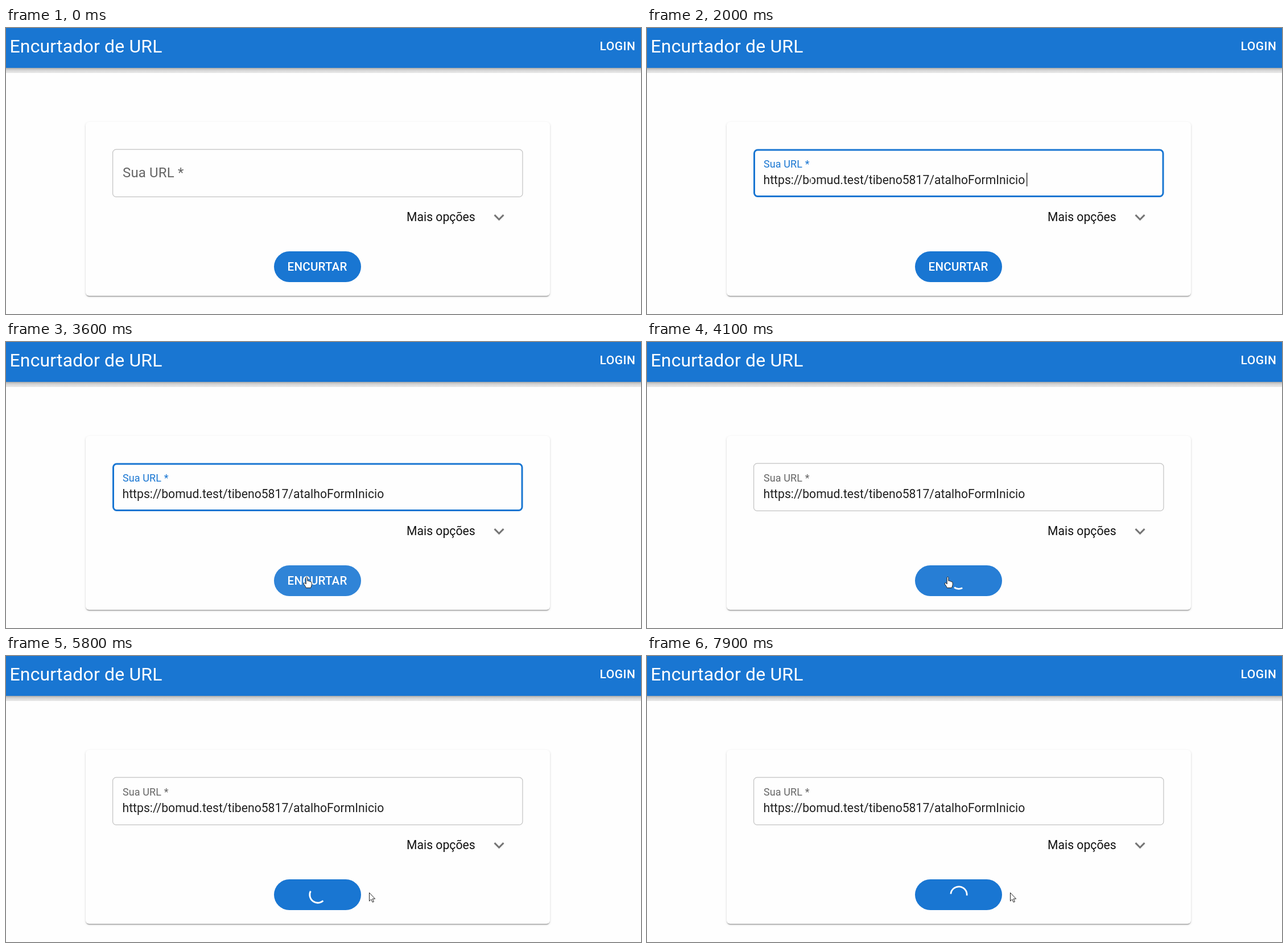
Animation, 1116 px wide and 502 px high, one loop 8 s. Source, as an HTML page:

```html
<!DOCTYPE html>
<html lang="pt">
<head>
<meta charset="utf-8">
<title>Encurtador de URL</title>
<style>
  html, body { margin: 0; width: 100%; height: 100%; overflow: hidden; background: #fefefe; }
  .stage { position: relative; width: 1116px; height: 502px; overflow: hidden; }
  .bar { position: absolute; left: 0; top: 0; width: 100%; height: 70px; background: #1976d2; }
  .bar::after {
    content: ""; position: absolute; left: 0; top: 70px; width: 100%; height: 9px;
    background: linear-gradient(#a8a8a8, #cfcfcf 35%, #e2e2e2 75%, #e8e8e8);
  }
  .card {
    position: absolute; left: 140px; top: 165px; width: 816px; height: 305px;
    border-radius: 6px; background: #fefefe;
    box-shadow: 0 3px 1.5px -1.5px rgba(0,0,0,.2), 0 1.5px 1.5px rgba(0,0,0,.14), 0 1.5px 4.5px rgba(0,0,0,.12);
  }
  svg { position: absolute; left: 0; top: 0; }
  text { font-family: Roboto, sans-serif; white-space: pre; }
  .title { font-size: 32px; letter-spacing: .15px; fill: #fff; }
  .login { font-size: 21px; font-weight: 500; letter-spacing: .5px; fill: #fff; }
  .action { font-size: 20.6px; font-weight: 500; letter-spacing: .2px; fill: #fff; }
  .body { font-size: 21.2px; }
  .label { font-size: 24px; letter-spacing: .15px; }
  .cursor path { fill: #fff; stroke: #222; stroke-width: 1; stroke-linejoin: round; }
  .cursor .beam { fill: none; stroke: #fff; stroke-width: 2; }
</style>
</head>
<body>
<div class="stage">
  <div class="bar"></div>
  <div class="card"></div>
  <svg width="1116" height="502" viewBox="0 0 1116 502">
    <text class="title" x="6.5" y="43">Encurtador de URL</text>
    <text class="login" x="1043.5" y="39">LOGIN</text>

    <rect id="field" fill="none"/>
    <g id="label"><text class="label">Sua URL *</text></g>
    <text id="url" class="body" x="204.5" y="274" fill="#212121">https://bomud.test/tibeno5817/atalhoFormInicio</text>
    <rect id="caret" y="254" width="1.3" height="24" fill="#222"/>

    <text class="body" x="704" y="339" fill="#111">Mais opções</text>
    <path transform="translate(848.5 314.2) scale(1.5)" fill="#757575"
      d="M16.59 8.59 12 13.17 7.41 8.59 6 10l6 6 6-6z"/>

    <rect x="471" y="392" width="153" height="54" rx="27" fill="#1976d2"/>
    <rect id="ripple" x="471" y="392" width="153" height="54" rx="27" fill="#fff"/>
    <text id="action" class="action" x="494.6" y="425.5">ENCURTAR</text>
    <g id="spinner">
      <circle id="arc" r="14.2" fill="none" stroke="#fff" stroke-width="2.8" pathLength="125.66"/>
    </g>

    <g id="cursor" class="cursor">
      <path id="arrow" d="M.5 .5V15.2L3.8 12.1 6.2 17.2 8.4 16.2 6.1 11.2H10.6Z"/>
      <path id="beam" class="beam" d="M-3 -10Q0 -10 0 -8V8Q0 10 -3 10M3 -10Q0 -10 0 -8V8Q0 10 3 10"/>
      <path id="hand" d="M-.8 1.6Q-.8 .4 .5 .4T1.8 1.6V7.2Q4 6.4 4.5 8 6.6 7.4 7 8.9 9.2 8.5 9.2 10.8V14.5L7.6 19.5H-.8L-1.4 17.5-4.6 13Q-5.4 11.2-3.8 10.8T-.8 13Z"/>
    </g>
  </svg>
</div>
<script>
const LOOP = 8000, STEP = 100;
const HOLDS = [3500, 4600, 5700, 6600, 7700];
const CLICK = 1300, PASTE = 1900, PRESS = 3600, BLUR = 3700, LOAD = 3870;
const BLUE = '#1976d2';

const el = {};
document.querySelectorAll('[id]').forEach(n => el[n.id] = n);

const clamp = x => Math.min(1, Math.max(0, x));
const mix = (a, b, k) => a + (b - a) * k;
const smooth = x => x * x * (3 - 2 * x);
const easeOut = x => 1 - (1 - x) ** 3;
const show = (node, on) => node.setAttribute('visibility', on ? 'visible' : 'hidden');
const set = (node, attrs) => {
  for (const k in attrs) node.setAttribute(k, attrs[k]);
};

// Pointer trips: start, duration, from, to
const trips = [
  [300, 900, [86, 26], [288.5, 266]],
  [2700, 700, [288.5, 266], [528, 412]],
  [4100, 400, [528, 412], [638, 415]]
];

function pointer(t) {
  const [start, span, a, b] = trips.filter(trip => t >= trip[0]).pop() || trips[0];
  const k = smooth(clamp((t - start) / span));
  return [mix(a[0], b[0], k), mix(a[1], b[1], k)];
}

function drawPointer(t) {
  const [x, y] = pointer(t);
  const inField = x > 187 && x < 908 && y > 213 && y < 297;
  const inButton = x > 471 && x < 624 && y > 392 && y < 446;
  const on = t >= 400;
  set(el.cursor, { transform: `translate(${x} ${y})` });
  show(el.beam, on && inField);
  show(el.hand, on && inButton);
  show(el.arrow, on && !inField && !inButton);
  return on && inField;
}

function drawField(t, hover) {
  const focus = t > CLICK && t < BLUR;
  const w = focus ? 3 : 1.2;
  set(el.field, {
    x: 187 + w / 2, y: 212.5 + w / 2, width: 721.5 - w, height: 84.5 - w, rx: 6,
    stroke: focus ? BLUE : hover ? '#212121' : '#c2c2c2', 'stroke-width': w
  });

  const k = easeOut(clamp((t - CLICK + 2) / 200));
  set(el.label, {
    transform: `translate(205 ${mix(262, 244.5, k)}) scale(${mix(1, .75, k)})`,
    fill: t >= CLICK && t < BLUR ? BLUE : '#666'
  });

  const pasted = t >= PASTE;
  show(el.url, pasted);
  const lit = pasted ? t < 2500 || (t >= 3000 && t < PRESS) : t >= CLICK;
  set(el.caret, { x: pasted ? 667 : 205 });
  show(el.caret, lit);
}

function drawButton(t) {
  const glow = t < PRESS ? 0 : t < LOAD ? .1 : .1 * clamp((4400 - t) / 500);
  set(el.ripple, { opacity: glow });

  const age = t - LOAD, busy = age >= 0;
  show(el.action, !busy);
  show(el.spinner, busy);
  if (!busy) return;
  const p = age % 1500 / 750;
  const k = smooth(p % 1);
  const dash = p < 1 ? mix(1, 90, k) : 90;
  const shift = p < 1 ? mix(0, 35, k) : mix(35, 124, k);
  set(el.spinner, { transform: `translate(548 419) rotate(${age * .18})` });
  set(el.arc, { 'stroke-dasharray': `${dash} 150`, 'stroke-dashoffset': -shift });
}

function render(now) {
  let t = Math.floor(now % LOOP / STEP) * STEP;
  if (HOLDS.includes(t)) t -= STEP;
  drawField(t, drawPointer(t));
  drawButton(t);
}

const begin = performance.now();
function loop() {
  render(performance.now() - begin);
  requestAnimationFrame(loop);
}
loop();
</script>
</body>
</html>
```
